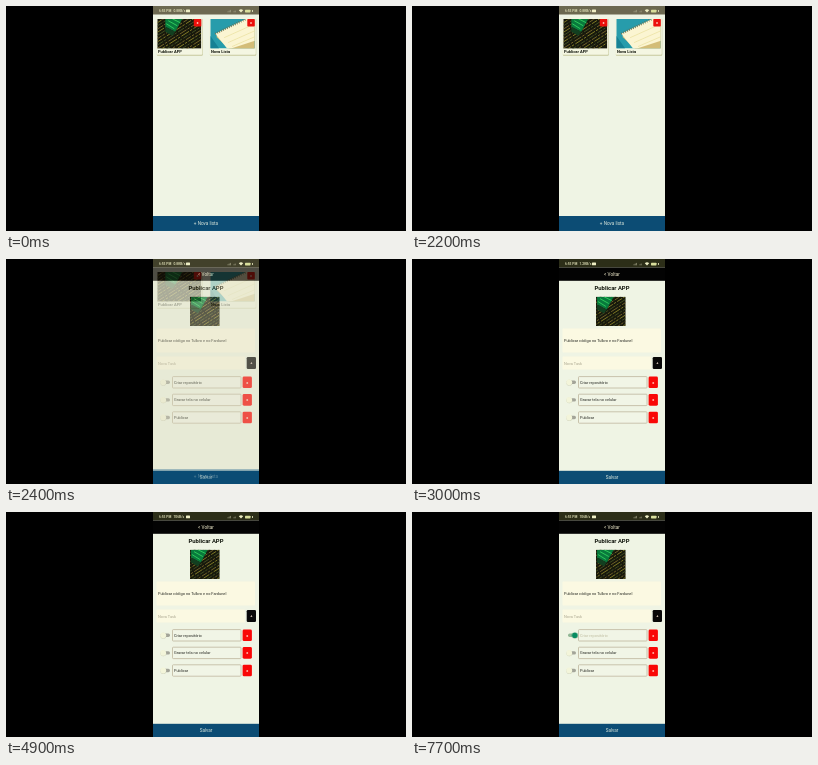
An HTML page for the animation above (8000 ms loop, 400 px wide and 225 px high).

```html
<!DOCTYPE html>
<html lang="pt">
<head>
<meta charset="utf-8">
<title>Lista de tarefas</title>
<style>
  html, body { margin: 0; width: 100%; height: 100%; overflow: hidden; background: #000; }
  svg { display: block; width: 100vw; height: 100vh; }
  text { font-family: Roboto, Arial, sans-serif; font-size: 3.9px; fill: #20221c; }
  .bold { font-weight: 700; fill: #11150c; }
  .mid { text-anchor: middle; }
  .page { fill: #eff4e4; }
  .field { fill: #fbf9e2; }
  .footer { fill: #0c4c74; }
  .bar { font-size: 4.65px; fill: #dce8dc; }
  .status text { font-size: 3.3px; font-weight: 500; fill: #eeeec4; }
  .mark { font-size: 4px; font-weight: 700; fill: #ffe9d8; }
</style>
</head>
<body>
<svg viewBox="0 0 400 225">
  <defs>
    <symbol id="code" viewBox="0 0 44 30" preserveAspectRatio="xMidYMid slice">
      <rect width="44" height="30" fill="#17180c"/>
      <g id="codeLines"></g>
    </symbol>
    <symbol id="notebook" viewBox="0 0 45 30" preserveAspectRatio="none">
      <rect width="45" height="30" fill="#279cab"/>
      <path d="M0 30V17L9 30z" fill="#168194"/>
      <path d="M6 18L20 31H45V2L38 0z" fill="#d3bd78"/>
      <path d="M5 15L36 0H45V22L21 30H17z" fill="#fbf5d2"/>
      <path d="M5 15L36 0" stroke="#70663e" stroke-width="2.4" stroke-dasharray=".7 1.5"/>
      <path d="M14 19L45 5M18 24L45 12M22 28L45 18" stroke="#eadf9c" stroke-width=".7"/>
    </symbol>
    <clipPath id="screen"><rect x="147" width="106" height="225"/></clipPath>
  </defs>

  <rect width="400" height="225" fill="#000"/>
  <g clip-path="url(#screen)">
    <g id="home">
      <rect class="page" x="147" width="106" height="225"/>
      <rect x="147" width="106" height="8.5" fill="#6c6850"/>
      <g id="cards"></g>
      <rect id="dim" x="147" y="8.5" width="106" height="202" fill="#8b6325" opacity="0"/>
      <rect class="footer" x="147" y="210" width="106" height="15"/>
      <text class="bar mid" x="200" y="219.3">+ Nova lista</text>
    </g>

    <g id="detail" opacity="0">
      <rect class="page" x="147" width="106" height="225"/>
      <rect x="147" width="106" height="8.5" fill="#2c2e18"/>
      <rect x="147" y="8.5" width="106" height="13.3" fill="#030303"/>
      <text class="bar mid" x="200" y="17" style="fill:#f2edcd">&lt; Voltar</text>
      <text class="bold mid" x="200" y="31.2" style="font-size:5.9px">Publicar APP</text>
      <use href="#code" x="184" y="37.7" width="29.5" height="29.3"/>
      <rect class="field" x="150.5" y="69.5" width="98.5" height="24" rx="1"/>
      <text x="152" y="83.2">Publicar código no Tulbro e no Fardunel</text>
      <rect class="field" x="150.5" y="97.5" width="88.5" height="13" rx="1"/>
      <text x="152" y="105.5" style="fill:#aaa68f">Nova Task</text>
      <rect x="240.7" y="98" width="9.3" height="12" rx="1.3" fill="#080808"/>
      <text class="mark mid" x="245.4" y="105.4">+</text>
      <g id="tasks"></g>
      <rect class="footer" x="147" y="211.8" width="106" height="13.2"/>
      <text class="bar mid" x="200" y="220.1">Salvar</text>
    </g>

    <g class="status">
      <text x="153" y="6.2">6:55 PM</text>
      <text id="rateA" x="167.5" y="6.2">0.8KB/s</text>
      <text id="rateB" x="167.5" y="6.2" opacity="0">1.2KB/s</text>
      <text id="rateC" x="167.5" y="6.2" opacity="0">706B/s</text>
      <rect x="180" y="3.6" width="4" height="2.7" rx=".5" fill="#eeeec4"/>
      <path d="M222 6.3v-1M223.2 6.3v-1.7M224.4 6.3v-2.4M228 6.3v-1M229.2 6.3v-1.7" stroke="#aaa88b" stroke-width=".7"/>
      <path d="M232.8 4.2q2.2-1.9 4.4 0L235 6.6z" fill="#eeeec4"/>
      <rect x="239" y="3.7" width="5.5" height="2.7" rx=".6" fill="#d9df9c"/>
      <path d="M246.5 4.2v1.6" stroke="#eeeec4"/>
    </g>
  </g>
</svg>
<script>
const LOOP = 8000;
const $ = id => document.getElementById(id);

// Slanted rows of code with a bright green block in one corner.
function codeLines() {
  let out = '';
  for (let i = 0; i < 16; i++) {
    const y = 4 + i * 3.2;
    const color = ['#8a8428', '#465324', '#7a6a2c'][i % 3];
    out += `<path d="M0 ${y}L44 ${y - 28}" stroke="${color}" stroke-width=".9" stroke-dasharray="${5 + i % 5} 1.2 2.5 1.6"/>`;
  }
  return out + `<path d="M8 0H25L18 13L8 8z" fill="#087a3c"/>
    <path d="M8 8L18 13L15 17L8 13z" fill="#123f20"/>
    <path d="M9 5l8 5M11 2l9 5M15 0l8 4" stroke="#2fc95c" stroke-width="1"/>`;
}

function card(x, title, photo, width) {
  return `<rect x="${x - .5}" y="12.7" width="${width + 2}" height="37" rx="1" fill="#c7c99d"/>
    <rect x="${x - 1}" y="12" width="${width + 2}" height="36.8" rx="1" fill="#f4f6e2"/>
    <use href="#${photo}" x="${x}" y="13" width="${width}" height="29.5"/>
    <rect x="${x + width - 7.5}" y="13" width="7.5" height="7.5" rx=".8" fill="#ec100c"/>
    <text class="mark mid" x="${x + width - 3.75}" y="18">x</text>
    <text class="bold" x="${x + .6}" y="46.8" style="font-size:4.05px">${title}</text>`;
}

function task(y, label, i) {
  return `<rect id="rail${i}" x="156" y="${y - 1.7}" width="8" height="3.4" rx="1.7" fill="#a3a498"/>
    <g id="knob${i}">
      <circle id="halo${i}" cx="157.2" cy="${y}" r="6" fill="#4c5046" opacity="0"/>
      <circle cx="157.3" cy="${y + .4}" r="2.9" fill="#c9ccb4"/>
      <circle id="thumb${i}" cx="157.2" cy="${y}" r="2.9" fill="#f3f5da"/>
    </g>
    <rect x="166.5" y="${y - 5.7}" width="68.5" height="11.4" rx=".8" fill="#f1f5e6" stroke="#b8ae94" stroke-width=".7"/>
    <text id="label${i}" x="168" y="${y + 1.4}">${label}</text>
    <rect x="236.6" y="${y - 5.8}" width="9.3" height="11.6" rx="1.4" fill="#f90706"/>
    <text class="mark mid" x="241.2" y="${y + 1.2}">x</text>`;
}

$('codeLines').innerHTML = codeLines();
$('cards').innerHTML = card(151.3, 'Publicar APP', 'code', 44) + card(204.3, 'Nova Lista', 'notebook', 44.5);
$('tasks').innerHTML = ['Criar repositório', 'Gravar tela no celular', 'Publicar']
  .map((label, i) => task(123.3 + i * 17.6, label, i)).join('');

// Each step is [milliseconds, value]; values hold until the next step.
function play(id, prop, steps) {
  const last = steps[steps.length - 1][1];
  const frames = [...steps, [LOOP, last]].map(([ms, value]) =>
    ({ offset: ms / LOOP, [prop]: value, easing: 'steps(1, end)' }));
  const motion = $(id).animate(frames, { duration: LOOP, iterations: Infinity });
  motion.startTime = document.timeline.currentTime || 0;
}

play('detail', 'opacity', [[0, 0], [2300, .13], [2400, .65], [2500, 1]]);
play('dim', 'opacity', [[0, 0], [2300, .2]]);
play('rateA', 'opacity', [[0, 1], [2500, 0]]);
play('rateB', 'opacity', [[0, 0], [2500, 1], [4300, 0]]);
play('rateC', 'opacity', [[0, 0], [4300, 1]]);

// The first switch is pressed, slides on, and its ripple fades.
play('halo0', 'opacity', [[0, 0], [6300, .3], [6400, .55], [6500, .7], [6600, .5], [6700, .3], [6800, .12], [6900, 0]]);
play('knob0', 'transform', [[0, 'none'], [6400, 'translateX(3.6px)'], [6500, 'translateX(5.6px)']]);
play('thumb0', 'fill', [[0, '#f3f5da'], [6400, '#078b61']]);
play('rail0', 'fill', [[0, '#a3a498'], [6400, '#91b795']]);
play('label0', 'fill', [[0, '#20221c'], [6400, '#bfbda0']]);
</script>
</body>
</html>
```
